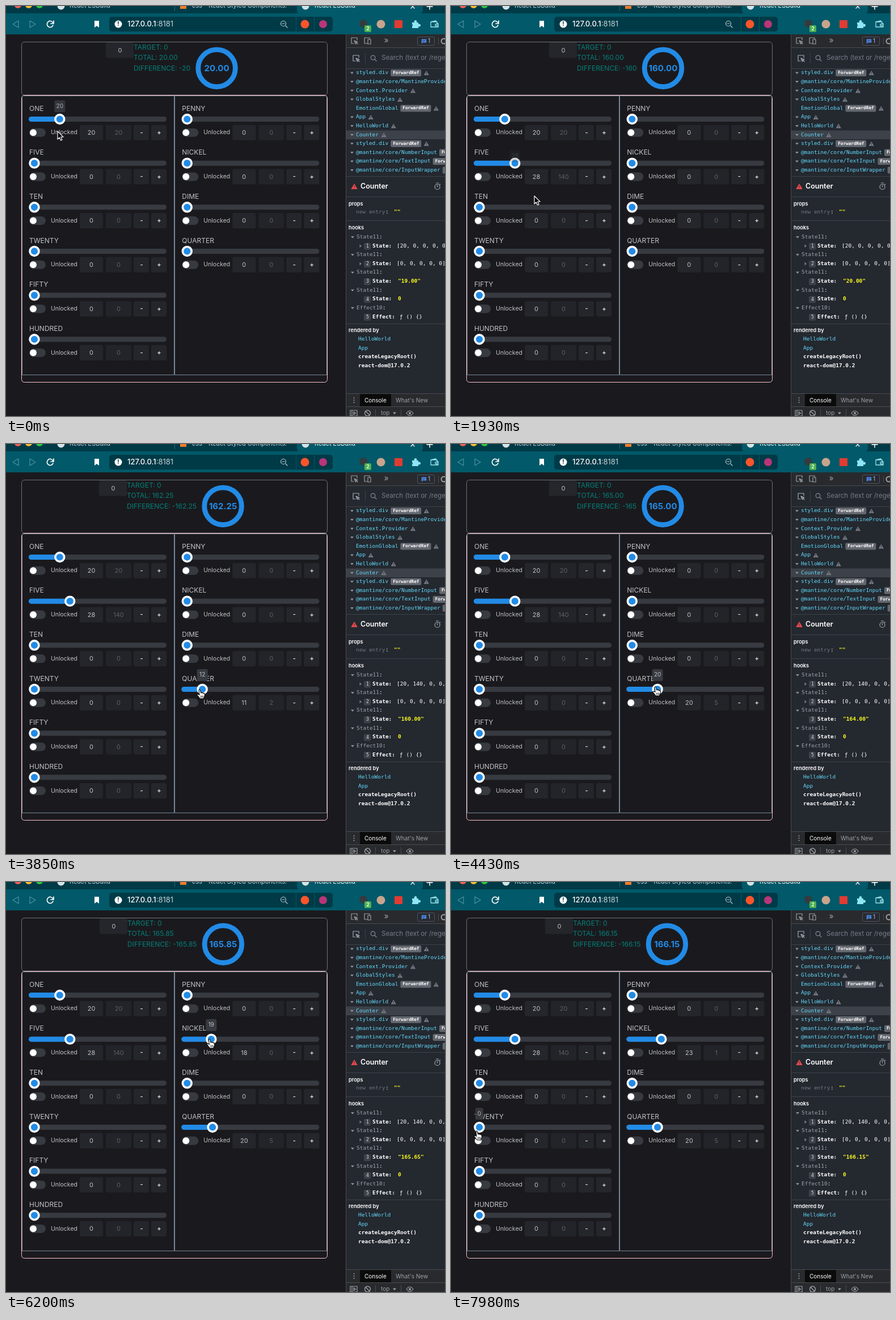
Animation of 774x723 px, one loop 8 s. Source, as an HTML page with a canvas:

```html
<!DOCTYPE html>
<html lang="en">
<head>
<meta charset="utf-8">
<title>Money counter</title>
<style>
html, body { margin: 0; width: 100%; height: 100%; overflow: hidden; background: #1a1a1e; }
canvas { display: block; }
</style>
</head>
<body>
<canvas id="stage" width="774" height="723"></canvas>
<script>
const ctx = document.getElementById('stage').getContext('2d');
const SANS = 'Inter, sans-serif', MONO = '"DejaVu Sans Mono", monospace';
const LOOP = 8000, STEP = 147.8;
const BLUE = '#228be6', TEXT = '#c1c2c5', DIM = '#5c5f66', FIELD = '#25262b', TRACK = '#373a40';
const BAR = '#015969', STRIP = '#003a47', PANEL = '#24282f', RULE = '#3d424a';
const CYAN = '#61dafb', YELLOW = '#fdfd20';

// ---- drawing helpers ----
function rect(x, y, w, h, fill, r = 0, stroke) {
  ctx.beginPath();
  ctx.roundRect(x, y, w, h, r);
  if (fill) { ctx.fillStyle = fill; ctx.fill(); }
  if (stroke) { ctx.strokeStyle = stroke; ctx.lineWidth = 1; ctx.stroke(); }
}
function circle(x, y, r, fill, stroke, width = 1) {
  ctx.beginPath();
  ctx.arc(x, y, r, 0, 7);
  if (fill) { ctx.fillStyle = fill; ctx.fill(); }
  if (stroke) { ctx.strokeStyle = stroke; ctx.lineWidth = width; ctx.stroke(); }
}
function text(str, x, y, size, color, { font = SANS, weight = 400, align = 'left' } = {}) {
  ctx.font = `${weight} ${size}px ${font}`;
  ctx.textAlign = align;
  ctx.textBaseline = 'middle';
  ctx.fillStyle = color;
  ctx.fillText(str, x, y);
}
const center = (str, x, y, size, color, weight) => text(str, x, y, size, color, { weight, align: 'center' });
const mono = (str, x, y, color, weight, size = 9.5) => text(str, x, y, size, color, { font: MONO, weight });
function icon(d, x, y, stroke, fill, width = 1.2) {
  const path = new Path2D(d);
  ctx.save();
  ctx.translate(x, y);
  ctx.lineJoin = ctx.lineCap = 'round';
  if (fill) { ctx.fillStyle = fill; ctx.fill(path); }
  if (stroke) { ctx.strokeStyle = stroke; ctx.lineWidth = width; ctx.stroke(path); }
  ctx.restore();
}

// ---- timeline, counted in screen refreshes ----
function along(keys, s) {
  if (s <= keys[0][0]) return keys[0].slice(1);
  for (let i = 1; i < keys.length; i++) {
    const [s0, ...a] = keys[i - 1], [s1, ...b] = keys[i];
    if (s <= s1) return a.map((v, k) => v + (b[k] - v) * (s - s0) / (s1 - s0));
  }
  return keys.at(-1).slice(1);
}
const POINTER = [
  [0, 91, 221], [1, 90, 224], [3, 72, 340], [5, 47, 578], [6, 46, 580], [8, 46, 533], [9, 47, 400],
  [10, 48, 276], [12, 111, 277], [13, 147, 335], [14, 172, 420], [15, 184, 500], [16, 166, 468],
  [19, 230, 455], [22, 314, 434], [24, 317, 433], [26, 341, 433], [29, 360, 428], [31, 360, 428],
  [34, 335, 310], [36, 315, 277], [38, 320, 277], [43, 368, 277], [44, 330, 310], [45, 240, 375],
  [46, 153, 441], [47, 126, 462], [48, 100, 500], [50, 70, 300], [52, 46, 410], [53, 45, 438], [54, 45, 439]
];
const DRAGS = {
  ONE: [[0, 20]],
  FIVE: [[10, 0], [12, 28]],
  QUARTER: [[24, 0], [26, 12], [29, 20]],
  NICKEL: [[36, 0], [38, 4], [43, 23]]
};
const TOOLTIPS = {
  ONE: [[0, .86], [2, 0]],
  FIVE: [[9, 0], [10, 1], [12, 1], [13, .2], [14, 0]],
  HUNDRED: [[4, 0], [5, 1], [6, 1], [7, 0]],
  QUARTER: [[21, 0], [23, 1], [31, 1], [33, 0]],
  NICKEL: [[35, 0], [36, 1], [43, 1], [45, 0]],
  TWENTY: [[52, 0], [54, .92]]
};
const INSPECTED = [[0, '19.00'], [2, '20.00'], [15, '160.00'], [28, '164.00'], [34, '165.00'], [41, '165.65'], [48, '166.15']];
const COLUMNS = [
  { ONE: 1, FIVE: 5, TEN: 10, TWENTY: 20, FIFTY: 50, HUNDRED: 100 },
  { PENNY: .01, NICKEL: .05, DIME: .1, QUARTER: .25 }
];
const amount = (name, s) => DRAGS[name] ? Math.floor(along(DRAGS[name], s)[0]) : 0;
const total = s => COLUMNS.reduce((sum, col) =>
  sum + Object.entries(col).reduce((n, [name, worth]) => n + amount(name, s) * worth, 0), 0);

// ---- browser window ----
function drawBrowser() {
  rect(0, 0, 774, 14, STRIP);
  rect(0, 13, 774, 37, BAR);
  rect(513, -6, 222, 20, BAR, 6);
  ['#f25f57', '#f5bd2f', '#2bc840'].forEach((c, i) => circle(21 + i * 19, -2, 6, c));
  circle(97, 0, 6.5, '#d3e3e6');
  circle(528, 0, 6.5, '#d3e3e6');
  rect(307, -6, 11, 11, '#ee7c2b');
  rect(297, 0, 1, 9, '#2d6672');
  text('React ESBuild', 112, 0, 11, '#c7d6d9');
  text('css - React Styled Components.', 328, 0, 11, '#c7d6d9');
  text('React ESBuild', 544, 0, 11, '#fff');
  icon('M-3-3L3 3M3-3L-3 3', 717, 1, '#fff');
  icon('M-5 0H5M0-5V5', 747, 1, '#fff', null, 1.5);

  icon('M5-6L-5 0L5 6Z', 17, 32, '#4c91a0');
  icon('M-5-6L5 0L-5 6Z', 47, 32, '#4c91a0');
  icon('M5-2A5.5 5.5 0 1 0 5 2M6-6V-1H1', 78, 32, '#fff', null, 1.7);
  icon('M-4-6H4V6L0 3L-4 6Z', 160, 32, null, '#fff');
  rect(182, 19, 394, 26, STRIP, 5);
  circle(198, 32, 6.5, '#fff');
  center('!', 198, 32, 10, STRIP, 700);
  text('127.0.0.1', 214, 32, 13, '#fff', { weight: 500 });
  const hostWidth = ctx.measureText('127.0.0.1').width;
  text(':8181', 214 + hostWidth, 32, 13, '#c3d4d8');
  circle(489, 31, 4.5, null, '#b5c9ce', 1.2);
  icon('M-2 0H2M4 4L7 7', 489, 31, '#b5c9ce');
  rect(511, 19, 1, 26, BAR);
  rect(543, 19, 1, 26, BAR);
  circle(527, 32, 7.5, '#fb542b');
  circle(559, 32, 7, '#b9357a');

  circle(630, 31, 7, '#343b40');
  rect(632, 34, 12, 12, '#4caf50', 2);
  center('2', 638, 40, 9, '#fff', 600);
  circle(661, 32, 7.5, '#c9a48d');
  rect(685, 25, 14, 14, '#e23b32', 1);
  icon('M-6-3H-2A2.5 2.5 0 1 1 2-3H5V0A2.5 2.5 0 1 1 5 4V7H-6V4A2.5 2.5 0 0 0-6 0Z', 722, 32, null, '#8fe6f5');
  icon('M-6-4H5V-1H7V5H-6ZM-6-4L3-6V-4M7 0H2V3H7', 755, 32, '#9be0ec', null, 1.3);
}

// ---- counter page ----
// The tooltip sinks toward its thumb as it fades.
function drawTooltip(value, x, mid, alpha) {
  const y = mid - 25 + 16 * (1 - alpha), width = value > 9 ? 19 : 14;
  ctx.globalAlpha = alpha;
  rect(x - width / 2, y - 10.5, width, 21, TRACK, 3);
  center(value, x, y, 10, TEXT);
  ctx.globalAlpha = 1;
}
function drawSlider(name, worth, dx, y, s) {
  const value = amount(name, s), count = amount(name, s - .1);
  const mid = y + 18.5, row = y + 42.3, thumb = dx + 50 + 2.24 * value;
  text(name, dx + 41, y, 12, TEXT);
  rect(dx + 40, mid - 4.5, 243, 9, TRACK, 4.5);
  if (value) rect(dx + 40, mid - 4.5, thumb - dx - 40, 9, BLUE, 4.5);
  circle(thumb, mid, 7.9, BLUE, '#fff', 3.6);

  rect(dx + 41, row - 7.5, 29, 15, TRACK, 7.5);
  circle(dx + 48, row, 6, '#fff');
  text('Unlocked', dx + 79, row, 10.5, TEXT);
  rect(dx + 130, row - 13.5, 41, 27, FIELD, 3);
  center(count, dx + 150.5, row + .5, 11, TEXT);
  rect(dx + 176, row - 13.5, 45, 27, '#232429', 3);
  center(Math.floor(count * worth), dx + 198.5, row + .5, 11, DIM);
  rect(dx + 225, row - 13.5, 27, 27, FIELD, 3);
  rect(dx + 256, row - 13.5, 27, 27, FIELD, 3);
  center('-', dx + 239, row, 11, '#e4e5e8', 600);
  center('+', dx + 270, row + .5, 11, '#e4e5e8', 600);

  const alpha = TOOLTIPS[name] ? along(TOOLTIPS[name], s)[0] : 0;
  if (alpha > 0) drawTooltip(value, thumb, mid, alpha);
}
function drawHeader(s) {
  const sum = total(s - .5).toFixed(2), difference = `DIFFERENCE: ${-sum}`;
  ctx.font = `12px ${SANS}`;
  const textWidth = ctx.measureText(difference).width;
  const left = Math.round(297 - (142 + textWidth) / 2), textX = left + 49;
  const ringX = textX + textWidth + 46.5;
  rect(27.5, 63.5, 539, 93.5, null, 5, '#6f7277');
  rect(left, 64, 49, 27.5, FIELD, 3);
  center('0', left + 25, 78.5, 11, TEXT);
  ['TARGET: 0', `TOTAL: ${sum}`, difference].forEach((line, i) => text(line, textX, 73 + i * 18.7, 12, '#04807a'));
  circle(ringX, 109.7, 32.8, null, BLUE, 8.8);
  center(sum, ringX, 110.5, 15, BLUE, 700);
}
function drawPage(s) {
  rect(0, 50, 600, 673, '#1a1a1e');
  drawHeader(s);
  rect(27.5, 157.5, 539, 506, null, 5, '#ffc0cb');
  rect(28.5, 158.5, 268, 492, null, 0, '#778899');
  rect(297.5, 158.5, 268, 492, null, 0, '#778899');
  COLUMNS.forEach((col, c) => Object.entries(col).forEach(([name, worth], i) =>
    drawSlider(name, worth, c * 269.3, 181 + i * 77.65, s)));
}

// ---- developer tools ----
const TREE = [
  ['styled.div', 1], ['@mantine/core/MantineProvider'], ['Context.Provider'], ['GlobalStyles'],
  ['EmotionGlobal', 1], ['App'], ['HelloWorld'], ['Counter'], ['styled.div', 1],
  ['@mantine/core/NumberInput', 1], ['@mantine/core/TextInput', 1], ['@mantine/core/InputWrapper', 1]
];
const CARET = 'M-3-1.5H3L0 2Z';
const POINTER_BOX = 'M-1 5H-5V-5H5V-1M0 0L6 2.5L3.3 3.3L2.5 6ZM3 3L6 6';

function warning(x, y, size, color) {
  icon(`M0 ${-size}L${size * 1.15} ${size}H${-size * 1.15}Z`, x, y, null, color);
  icon('M0-1V1M0 3V3', x, y, PANEL, null, 1);
}
function drawTree() {
  rect(600, 219.5, 174, 15.5, RULE);
  TREE.forEach(([name, forwarded], i) => {
    const y = 118 + i * 15.6;
    if (name !== 'EmotionGlobal') icon(CARET, 610, y, null, '#8f949d');
    mono(name, 617, y, CYAN);
    let x = 617 + ctx.measureText(name).width + 4;
    if (forwarded) {
      rect(x, y - 6, 54, 12, '#63676f', 2);
      mono('ForwardRef', x + 4, y, '#fff', 700, 7.7);
      x += 58;
    }
    warning(x + 5, y, 4, '#757a84');
  });
}
function drawHooks(s) {
  const state = INSPECTED.filter(([at]) => at <= s).at(-1)[1];
  const list = s < 15 ? '[20, 0, 0, 0, 0, 0]' : '[20, 140, 0, 0, 0, 0]';
  const hooks = [['State11', 'State:', list, '#fff', 689], ['State11', 'State:', '[0, 0, 0, 0, 0]', '#fff', 689],
    ['State11', 'State:', `"${state}"`, YELLOW, 691], ['State11', 'State:', '0', YELLOW, 691],
    ['Effect10', 'Effect:', 'ƒ () {}', '#fff', 694]];
  hooks.forEach(([group, label, value, color, x], i) => {
    const y = 407.5 + i * 31.25, row = y + 15.7;
    icon(CARET, 611, y, null, '#8f949d');
    mono(group, 618, y, '#9da2ab');
    mono(':', 618 + ctx.measureText(group).width, y, '#fff');
    if (i < 2) icon('M-1.5-3V3L2 0Z', 625, row, null, '#777d88');
    rect(631, row - 5.5, 12, 12, RULE, 2);
    mono(i + 1, 635, row + .5, '#d8dade', 400, 8);
    mono(label, 646, row, '#fff', 700);
    mono(value, x, row, color, color === YELLOW ? 700 : 400);
  });
}
function drawDevtools(s) {
  rect(599, 50, 175, 673, PANEL);
  rect(600, 50, 174, 23, '#292a2d');
  rect(600, 73, 174, 1, '#494c50');
  icon(POINTER_BOX, 614, 61, '#9aa0a6');
  icon('M-5-5H4V-2M-5-5V5H0M1-2H6V6H1Z', 637, 61, '#9aa0a6');
  center('»', 670.5, 60.5, 14, '#9aa0a6');
  rect(725.5, 54.5, 30, 15, '#292a2d', 2, '#4a5568');
  icon('M-4.5-4H4.5V3H-2L-4.5 5ZM-2.5-1.5H2.5M-2.5 1H1', 737, 62, '#292a2d', '#4f8ff7', .8);
  text('1', 744, 62, 10, '#9bbcf8');
  circle(772, 62, 4.5, null, '#9aa0a6', 2);
  rect(762, 56, 1, 12, '#494c50');

  icon(POINTER_BOX, 617, 92, '#a5aab3');
  rect(633, 83, 1, 18, RULE);
  circle(647, 91, 3.8, null, '#777d88', 1.4);
  icon('M3 3L6 6', 647, 91, '#777d88', null, 1.5);
  text('Search (text or /regex/)', 662, 91.5, 11.5, '#777d88');
  rect(600, 110, 174, 1, RULE);
  drawTree();

  rect(600, 297, 174, 426, PANEL);
  rect(600, 300, 174, 1, RULE);
  warning(614, 318, 5, '#e5484d');
  text('Counter', 625, 318.5, 12.5, '#fff', { weight: 600 });
  circle(760.5, 319, 4.5, null, '#a5aab3', 1.2);
  icon('M-2-7H2M0 0V-2.5M4-5L5-4', 760.5, 319, '#a5aab3');
  rect(600, 336, 174, 1, RULE);

  const heading = (label, y) => text(label, 604, y, 9.2, '#fff', { weight: 600 });
  heading('props', 349);
  mono('new entry', 617, 364, '#6f7580');
  mono(':', 669, 364, '#fff');
  mono('""', 684, 364, YELLOW, 700);
  rect(600, 378, 174, 1, RULE);
  heading('hooks', 391);
  drawHooks(s);
  rect(600, 560, 174, 1, RULE);
  heading('rendered by', 572.5);
  mono('HelloWorld', 621, 588, CYAN);
  mono('App', 621, 603.4, CYAN);
  mono('createLegacyRoot()', 621, 618.8, '#fff', 700);
  mono('react-dom@17.0.2', 621, 634.2, '#fff', 700);

  rect(600, 684, 174, 39, '#292a2d');
  rect(600, 683, 174, 1, '#494c50');
  [-4, 0, 4].forEach(dy => circle(613.5, 695 + dy, 1, '#9aa0a6'));
  rect(624, 684, 55, 22, '#0b0b0c');
  text('Console', 632, 695.5, 10, '#fff');
  text("What's New", 687, 695.5, 10, '#9aa0a6');
  rect(600, 706, 174, 1, '#494c50');
  icon('M-6-5H6V5H-6ZM-3-5V5M0-2.5V2.5L3.5 0Z', 613, 718, '#9aa0a6');
  circle(637.5, 718, 5, null, '#9aa0a6', 1.4);
  icon('M-3.5-3.5L3.5 3.5', 637.5, 718, '#9aa0a6', null, 1.4);
  rect(651, 711, 1, 12, '#494c50');
  text('top', 661, 718, 10, '#9aa0a6');
  icon(CARET, 685, 718, null, '#9aa0a6');
  rect(696, 711, 1, 12, '#494c50');
  icon('M-6 0Q0-8 6 0Q0 8-6 0Z', 712, 718, '#9aa0a6');
  circle(712, 718, 2, '#9aa0a6');
  rect(599, 50, 1, 673, '#494c50');
}

// ---- mouse pointer ----
const ARROW = 'M0 0V14L3.2 11L5.5 16L8 15L5.7 10H10Z';
const HAND = 'M-1 1Q0-1 1.5 1L2.5 6Q4 4.5 5 6.3Q6.5 5 7.5 7Q9 6 9.3 8V11L7.5 16H1L-4 9.5Q-4 7.5-2 8.2L0 9.5Z';
const BEAM = 'M-3-7Q0-7 0-5Q0-7 3-7M0-5V5M-3 7Q0 7 0 5Q0 7 3 7M-2 2H2';
const HAND_TIMES = [[5, 6], [10, 12], [22, 31], [36, 43], [53, 54]];

function drawPointer(s) {
  const [x, y] = along(POINTER, s);
  if (s === 46) {
    icon(BEAM, x, y, '#fff', null, 3.4);
    icon(BEAM, x, y, '#000', null, 1.2);
  } else if (HAND_TIMES.some(([from, to]) => s >= from && s <= to)) {
    icon(HAND, x, y, '#000', '#fff', 1.1);
    icon('M2.5 11V14M4.5 11V14M6.5 11V14', x, y, '#000', null, .8);
  } else {
    icon(ARROW, x, y, '#fff', '#000', 1.2);
  }
}

function render(now) {
  const s = Math.floor((now % LOOP + 15) / STEP);
  drawPage(s);
  drawBrowser();
  drawDevtools(s);
  drawPointer(s);
  requestAnimationFrame(render);
}
requestAnimationFrame(render);
</script>
</body>
</html>
```
